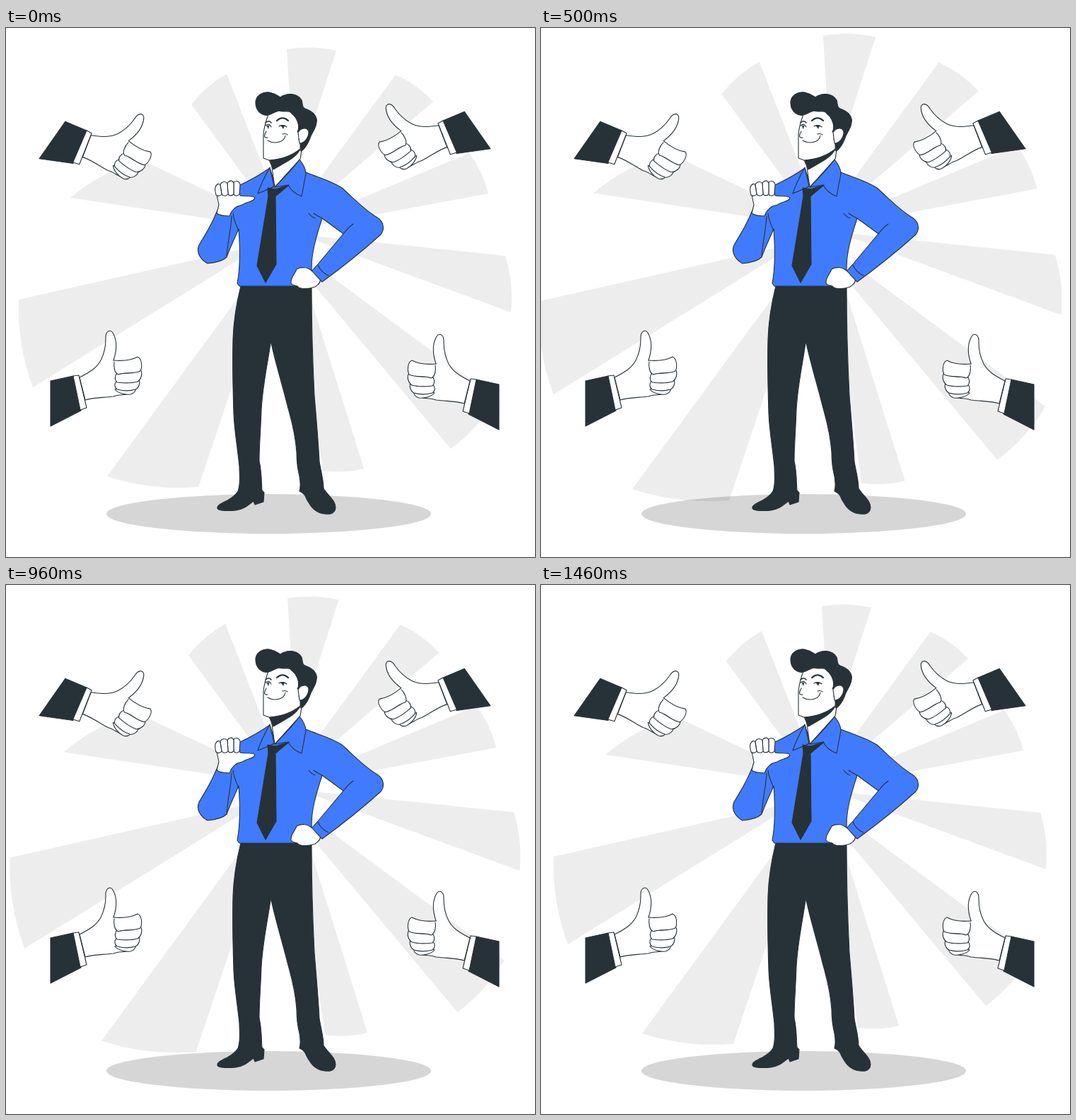
Recreate the animation shown at these times as an HTML page with a canvas. Size 748x748 px, loop 1.5 s.

```html
<!DOCTYPE html>
<html lang="en">
<head>
<meta charset="utf-8">
<title>Thumbs up</title>
<style>
  html, body { margin: 0; width: 100%; height: 100%; overflow: hidden; background: #fff; }
  canvas { display: block; width: 100vmin; height: 100vmin; }
</style>
</head>
<body>
<canvas id="stage" width="748" height="748"></canvas>
<script>
const ctx = document.getElementById('stage').getContext('2d');
const DARK = '#263238', BLUE = '#407bff', WHITE = '#fff', RAY = '#ededed';
const LOOP = 1500, STEP = 1000 / 24;

// Outer corners, then the apex, of each ray
const RAYS = [
  [397, 30, 467, 32, 408, 215],
  [551, 66, 604, 104, 387, 290],
  [655, 177, 682, 234, 387, 289],
  [706, 322, 714, 402, 415, 292],
  [693, 524, 629, 595, 370, 285],
  [506, 623, 448, 626, 402, 290],
  [272, 649, 143, 634, 390, 297],
  [38, 508, 18, 384, 364, 306],
  [91, 240, 190, 186, 404, 287],
  [262, 108, 312, 65, 405, 303]
];

// Time in ms and growth of the rays
const PULSE = [[0, 0], [281, .1], [856, 0], [1143, .1], [1291, .056], [1458, 0], [1500, 0]];

function growth(t) {
  const i = PULSE.findIndex(knot => knot[0] > t);
  const [t0, a] = PULSE[i - 1], [t1, b] = PULSE[i];
  return a + (b - a) * (t - t0) / (t1 - t0);
}

function shape(d, fill, width = 1.1) {
  const path = new Path2D(d);
  if (fill) {
    ctx.fillStyle = fill;
    ctx.fill(path);
  }
  ctx.lineWidth = width;
  ctx.strokeStyle = DARK;
  ctx.stroke(path);
}

function drawRays(scale) {
  ctx.save();
  ctx.translate(367, 343);
  ctx.scale(scale, scale);
  ctx.translate(-367, -343);
  ctx.fillStyle = RAY;
  ctx.beginPath();
  for (const [x1, y1, x2, y2, ax, ay] of RAYS) {
    const dx = x2 - x1, dy = y2 - y1;
    ctx.moveTo(ax, ay);
    ctx.lineTo(x1, y1);
    ctx.quadraticCurveTo((x1 + x2) / 2 + dy * .1, (y1 + y2) / 2 - dx * .1, x2, y2);
    ctx.closePath();
  }
  ctx.fill();
  ctx.restore();
}

function drawShadow() {
  ctx.fillStyle = 'rgba(0,0,0,.16)';
  ctx.beginPath();
  ctx.ellipse(371.5, 687, 229.5, 28, 0, 0, Math.PI * 2);
  ctx.fill();
}

function thumb() {
  shape('M63,499 L95,492 L106,541 L63,563 Z', DARK);
  shape('M95,492 L103,491 L114,537 L105,540 Z', WHITE);
  shape('M104,494 C118,487 128,481 134,470 C139,460 141,452 141,440 C140,429 147,425 151,431 C157,441 157,455 152,470 L162,473 L165,512 L180,514 C172,521 162,517 152,521 C138,523 124,522 112,526 Z', WHITE);
  shape('M158,510 C167,513 176,512 182,509 C185,512 181,517 176,518 C168,519 158,516 154,511 Z', WHITE);
  shape('M156,499 C166,502 178,501 187,496 C191,500 188,509 183,511 C174,514 165,513 157,511 C153,508 153,503 156,499 Z', WHITE);
  shape('M157,488 C168,489 180,488 190,483 C194,488 191,497 186,500 C176,503 166,502 157,501 C153,497 154,491 157,488 Z', WHITE);
  shape('M152,470 C164,471 177,470 186,465 C192,467 193,479 190,485 C179,490 169,486 159,490 C153,488 152,478 153,472', WHITE);
}

function drawThumbs() {
  const tilt = 35 * Math.PI / 180;
  const place = (pose) => { ctx.save(); pose(); thumb(); ctx.restore(); };
  const tilted = () => { ctx.translate(114, 145); ctx.rotate(tilt); ctx.translate(-95, -492); };
  const mirror = (x, y) => { ctx.translate(x, y); ctx.scale(-1, 1); };
  place(() => {});
  place(() => mirror(760, 5));
  place(tilted);
  place(() => { mirror(732, -14); tilted(); });
}

function drawLegs() {
  shape('M332,365 L432,365 C432,410 433,460 436,520 C439,555 442,590 443,613 C446,630 449,640 449,651 C455,661 466,668 466,678 C465,689 455,688 445,686 C434,682 430,675 425,666 C423,660 420,657 415,655 C417,648 416,640 415,634 C412,622 411,612 411,600 C409,570 402,550 397,530 C388,495 380,470 374.5,443 C369,480 363,505 361,540 C360,570 358,590 358,612 C362,630 361,645 362,654 L365,657 L364,670 L352,674 L350,669 C343,674 338,680 325,682 C315,683 300,683 299,679 C298,675 305,672 313,668 C320,664 325,660 328,655 C332,645 330,630 330,620 C327,590 323,570 322,545 C321,510 320,480 321,440 C322,410 327,385 332,365 Z', DARK);
}

function drawShirt() {
  shape('M373,198 C360,207 346,215 331,222 L310,236 L297,262 C290,280 281,293 273,307 C268,318 276,328 285,333 C295,332 306,330 312,324 C317,310 324,296 329,284 C331,310 331,340 327,361 L330,365 L433,365 L432,340 C432,318 438,297 447,269 L477,291 L441,334 L432,344 L447,359 C480,335 510,310 530,292 C536,284 534,274 525,268 C505,256 492,241 475,226 C460,216 443,212 424,204 L415,187 L381,223 Z', BLUE);
  shape('M319,266 C318,285 314,300 312,322 M321,262 C322,272 326,279 329,287 M428,262 C431,266 434,268 437,269 M435,262 C439,265 443,267 447,269 M477,291 C481,286 485,281 491,277 M441,335 C444,342 449,347 456,350', null);
  shape('M375,190 L380,225 L416,185 L418,172 Z', WHITE);
  shape('M371,184 C386,187 401,183 415,173 C409,184 395,190 378,200 Z', DARK);
  shape('M373,197 C367,208 360,221 356,234 L361,232 C368,229 374,227 379,224 Z', BLUE);
  shape('M415,186 C420,192 424,199 424,206 L418,238 C410,235 403,230 399,222 L380,225 C393,212 405,200 415,186 Z', BLUE);
  shape('M370,226 L381,228 L400,222 L381,238 L382,334 L367,360 L355,336 L371,238 Z', DARK);
}

function drawHead() {
  shape('M371,122 C368,130 365,140 364,150 L364,184 L372,187 C389,186 405,180 416,171 L418,130 L398,110 Z', WHITE);
  shape('M353,107 C352,95 365,88 376,92 C381,93 384,96 388,98 C397,91 412,92 418,102 C420,108 418,112 423,114 C435,118 441,126 439,134 C438,143 432,148 429,158 C426,166 420,173 417,174 C417,168 416,162 414,157 C418,150 417,145 412,147 C417,138 410,125 404,121 C401,115 394,120 386,117 C382,118 378,120 374,122 C365,126 354,120 353,107 Z', DARK);
  shape('M413,148 C417,140 427,140 428,147 C428,155 422,163 415,163 Z', WHITE);
  shape('M383,131 C388,126 394,126 399,131', null, 2.2);
  shape('M367,134 C370,131 373,131 375,134', null, 1.6);
  shape('M367,138 C370,135 373,136 375,140 M386,139 C389,137 394,137 397,140 M368,146 C365,151 364,156 370,155 M370,159 C378,164 393,163 395,152 M391,150 C394,149 396,149 398,151', null);
  shape('M369,138 L372,138 L371,142 Z M389,138 L394,138 L392,142 Z', DARK, .6);
}

function drawHands() {
  shape('M298,236 L301,250 L298,262 C303,266 310,265 316,266 C319,257 324,252 334,250 C340,246 352,245 352,240 C349,236 338,239 331,237 L330,228 L298,230 Z', WHITE);
  shape('M322,218 C326,215 331,217 331,222 L330,235 C327,239 323,237 322,235 Z', WHITE);
  shape('M313,219 C316,215 321,215 322,220 L322,235 C319,238 315,237 314,235 Z', WHITE);
  shape('M303,221 C305,217 311,216 313,220 L314,235 C311,239 306,237 305,235 Z', WHITE);
  shape('M296,225 C298,220 302,219 303,223 L305,235 C303,238 299,238 297,236 C296,232 295,229 296,225 Z', WHITE);
  shape('M433,344 C427,338 418,337 411,341 C409,347 402,353 403,361 C406,366 411,362 414,367 C421,370 431,368 437,366 C443,362 445,358 444,356 Z', WHITE);
}

function draw(now) {
  const frame = Math.floor((now % LOOP + 5) / STEP) % 36;
  ctx.fillStyle = WHITE;
  ctx.fillRect(0, 0, 748, 748);
  drawRays(1 + growth(frame * STEP));
  drawShadow();
  drawThumbs();
  drawLegs();
  drawShirt();
  drawHead();
  drawHands();
}

ctx.lineJoin = ctx.lineCap = 'round';
const start = performance.now();
function tick() {
  draw(performance.now() - start);
  requestAnimationFrame(tick);
}
tick();
</script>
</body>
</html>
```
